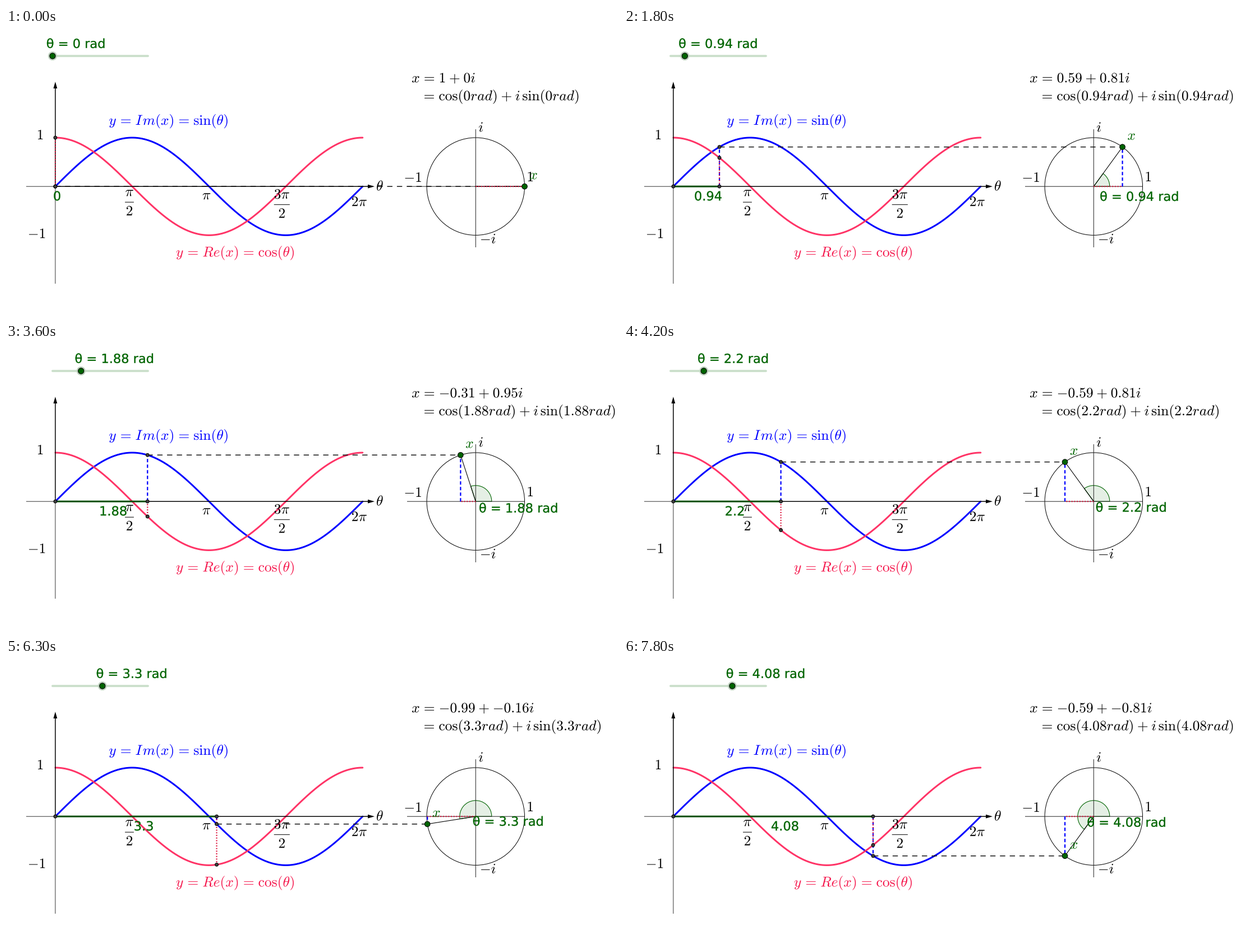
A matplotlib script that plays this animation: 1091 by 513 pixels, repeating every 8 s.

```python
import numpy as np
import matplotlib.pyplot as plt
from matplotlib.animation import FuncAnimation
from matplotlib.patches import Circle, PathPatch, Polygon, Wedge
from matplotlib.path import Path
from matplotlib.textpath import TextPath

W, H, DPI = 1091, 513, 72          # at 72 dpi one point is one pixel
UNIT = 87.2                        # pixels per unit on both plots
OX, OY = 87.9, 283.2               # origin of the graph
CX = 837.3                         # centre of the unit circle
ARC = 28.5
STEP, LAST = np.pi / 20, 26
MATH, SANS = 25.45, 22.5

GREEN, BLUE, RED, PINK = "#006400", "#0000ff", "#dc143c", "#ff3366"
LONG, SHORT, DOTS = (0, (9.4, 8)), (0, (6, 4)), (0, (2, 2.7))

plt.rcParams.update({
    "font.family": "DejaVu Sans",
    "mathtext.fontset": "cm",
    "lines.scale_dashes": False,
    "path.snap": False,
})

fig = plt.figure(figsize=(W / DPI, H / DPI), dpi=DPI, facecolor="white")
ax = fig.add_axes([0, 0, 1, 1])
ax.set(xlim=(0, W), ylim=(H, 0))
ax.axis("off")


def ink_edges(path):
    xs = path.vertices[path.codes != Path.CLOSEPOLY, 0]
    return xs.min(), xs.max()


def text_path(s, x, y, size=MATH, ink=True):
    """Outline of s on baseline y; x is its ink edge or its pen origin."""
    tp = TextPath((0, 0), s, size=size)
    left = ink_edges(tp)[0] if ink else 0
    return Path(tp.vertices * [1, -1] + [x - left, y], tp.codes)


def label(s, x, y, color="black"):
    ax.add_patch(PathPatch(text_path(s, x, y), fc=color, ec="none", zorder=8))


def live_text(color="black", edge=0.0):
    patch = PathPatch(Path([(0, 0)]), fc=color, ec=color if edge else "none",
                      lw=edge, zorder=9)
    return ax.add_patch(patch)


def line(xs, ys, color="black", lw=1.0, ls="-", z=3, cap="butt"):
    return ax.plot(xs, ys, color=color, lw=lw, ls=ls, zorder=z,
                   solid_capstyle=cap)[0]


def dot(x, y, r, fc, ec="black", lw=1.0):
    return ax.add_patch(Circle((x, y), r, fc=fc, ec=ec, lw=lw, zorder=10))


def fraction(top, cx, base):
    """Fraction over 2, centred on cx, with its bar above the baseline."""
    for s, dy in (("2", 17.4), (top, -17)):
        half = ink_edges(text_path(f"${s}$", 0, 0))[1] / 2
        label(f"${s}$", cx - half, base + dy)
    line([cx - half - 1, cx + half + 1], [base - 6.3] * 2, z=8)


# mathtext sets tight operators; pad them to normal spacing
EQ = r"\hspace{0.116}=\hspace{0.116}"
PLUS = r"\hspace{0.052}+\hspace{0.052}"
RAD = r"r\hspace{0.03}ad"
Y = r"y\hspace{0.04}" + EQ


def num(v):
    return f"{round(float(v), 2) + 0:g}"


def math_num(v):
    return num(v).replace("-", "{-}")


# graph axes
line([36, OX], [OY, OY], "#333333")
line([OX, OX], [OY, 457], "#333333")
line([OX, 647], [OY, OY], lw=1.5, z=5)
line([OX, OX], [OY, 106], lw=1.5, z=5)
ax.add_patch(Polygon([(657, OY), (645, OY - 3.4), (645, OY + 3.4)], fc="black", zorder=5))
ax.add_patch(Polygon([(OX, 96), (OX - 3.4, 108), (OX + 3.4, 108)], fc="black", zorder=5))

# curves
t = np.linspace(0, 2 * np.pi, 300)
line(OX + UNIT * t, OY - UNIT * np.sin(t), BLUE, 3, z=4, cap="round")
line(OX + UNIT * t, OY - UNIT * np.cos(t), PINK, 3, z=4.1, cap="round")

# unit circle
ax.add_patch(Circle((CX, OY), UNIT, fill=False, ec="black", lw=1, zorder=3))
line([715, CX + UNIT], [OY, OY], "#222222")
line([CX, CX], [181, 392], "#222222")

# fixed labels
label("$1$", 57, 199)
label("${-}1$", 41, 375.5)
label(r"$\theta$", 661, 290.5)
label(r"$\pi$", 350.5, 306.5)
label(r"$2\pi$", 617, 318.3)
fraction(r"\pi", 220, 317.6)
fraction(r"3\pi", 491.8, 322)
label("$i$", 843, 185.5)
label("${-}i$", 847, 385)
label("${-}1$", 711.5, 275)
label("$1$", 930.5, 274)
label(f"${Y}I\\hspace{{0.09}}m(x){EQ}\\sin(\\theta)$", 184, 173, BLUE)
label(f"${Y}Re(x){EQ}\\cos(\\theta)$", 303.7, 408.5, "#f5144a")

# slider
line([83, 253], [50, 50], "#cce0cc", 4, z=1, cap="round")
halo = dot(83, 50, 8, "#bfd3bf", "none", 0)
knob = dot(83, 50, 5.1, GREEN)

# moving parts
wedge = ax.add_patch(Wedge((CX, OY), ARC, 0, 0, fc=(0, 0.39, 0, 0.1),
                           ec=GREEN, lw=1.1, zorder=2))
span = line([], [], "#004d00", 3, z=5.2)
radius = line([], [], lw=1.1, z=5)
level = line([], [], lw=1.4, ls=LONG, z=6)
sin_left, sin_right = (line([], [], BLUE, 2.2, SHORT, z=6.1) for _ in range(2))
cos_left, cos_right = (line([], [], RED, 2.2, DOTS, z=6.2) for _ in range(2))

dot(OX, OY, 2.9, "#404040")
foot, on_sin, on_cos = (dot(OX, OY, 2.9, "#404040") for _ in range(3))
point = dot(CX, OY, 4.8, GREEN)

slider_text, span_text, angle_text = (live_text(GREEN, 0.35) for _ in range(3))
name_text = live_text(GREEN)
row1, row2 = live_text(), live_text()


def draw(i):
    th = min(i // 3, LAST) * STEP
    c, s = np.cos(th), np.sin(th)
    x = OX + UNIT * th
    px, py = CX + UNIT * c, OY - UNIT * s
    cy = OY - UNIT * c
    value = num(th)
    caption = f"θ = {value} rad"

    sx = 83 + 26.93 * th
    halo.center = knob.center = (sx, 50)
    slider_text.set_path(text_path(caption, sx - 10, 35.7, SANS))

    span.set_data([OX, x], [OY, OY])
    span_text.set_path(text_path(value, (OX + x) / 2 - 4, 308.2, SANS, ink=False))

    level.set_data([x, px], [py, py])
    sin_left.set_data([x, x], [OY, py])
    sin_right.set_data([px, px], [OY, py])
    cos_left.set_data([x, x], [OY, cy])
    cos_right.set_data([CX, px], [OY, OY])
    radius.set_data([CX, px], [OY, py])
    foot.center, on_sin.center, on_cos.center = (x, OY), (x, py), (x, cy)
    point.center = (px, py)
    name_text.set_path(text_path("$x$", px + 9.6, py - 12.7))

    # the y axis points down, so the angle opens to negative degrees
    wedge.set_theta1(-np.degrees(th))
    wedge.set_visible(th > 0)
    angle_text.set_visible(th > 0)
    angle_text.set_path(text_path(caption, CX - 3.1 + 16.9 * np.cos(th / 2),
                                  316.6 - 16.9 * np.sin(th / 2), SANS))

    arg = f"({value}{RAD})"
    row1.set_path(text_path(f"$x{EQ}{math_num(c)}{PLUS}{math_num(s)}i$", 724, 97.3))
    row2.set_path(text_path(f"${EQ}\\cos{arg}{PLUS}i\\,\\sin{arg}$", 746, 129.2))
    return []


anim = FuncAnimation(fig, draw, frames=80, interval=100, init_func=lambda: draw(0),
                     repeat=True, repeat_delay=0, blit=False)
plt.show()
```
